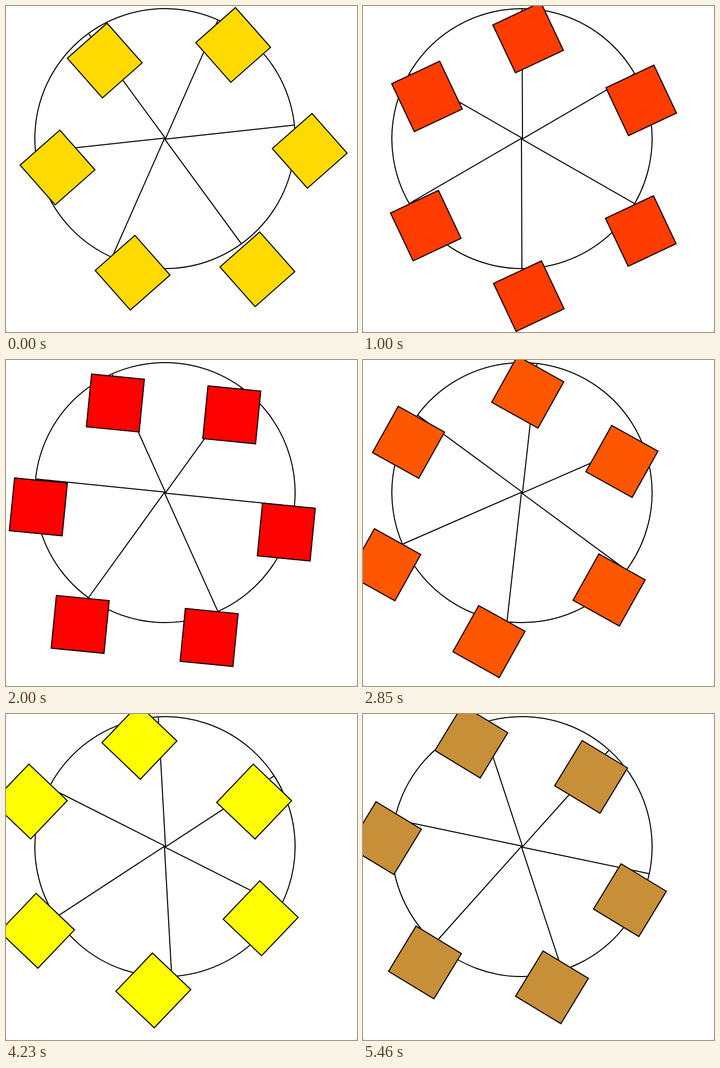
Recreate the animation shown at these times as an HTML page. Size 669 px wide and 622 px high, loop 5.54 s.

```html
<!DOCTYPE html>
<html lang="en">
<head>
<meta charset="utf-8">
<title>Ferris wheel</title>
<style>
  html, body { margin: 0; width: 100%; height: 100%; overflow: hidden; background: #fff; }
  body { position: relative; }

  /* dark specks in the bottom corners */
  body::before, body::after {
    content: ""; position: absolute; bottom: 0; width: 1px; height: 1px; background: #222;
  }
  body::before { left: 0; }
  body::after { right: 0; }

  .wheel {
    position: absolute; left: 54px; top: 4px; width: 494px; height: 494px;
    border: 2px solid #000; border-radius: 50%;
  }
  .line {
    position: absolute; left: 50%; top: 50%; width: 50%; height: 2px;
    background: #000; transform-origin: 0 0;
  }
  .cabin {
    position: absolute; width: 20%; height: 20%;
    border: 2px solid #000; transform-origin: 50% 0;
  }
  .c1 { right: -8.5%; top: 50%; }
  .c2 { right: 17%; top: 93.5%; }
  .c3 { right: 67%; top: 93.5%; }
  .c4 { left: -8.5%; top: 50%; }
  .c5 { left: 17%; top: 7%; }
  .c6 { right: 17%; top: 7%; }
</style>
</head>
<body>
<div class="wheel"></div>
<script>
  const LOOP = 5540, STEPS = 72;
  // the wheel turns in small ticks, several per step
  const START = -66.2, TICK = 0.6, TICKS_PER_STEP = 4.6482;
  const RED = [255, 0, 0], YELLOW = [255, 255, 0], PURPLE = [128, 0, 128];
  const STOPS = [RED, YELLOW, PURPLE, YELLOW, RED];

  const wheel = document.querySelector('.wheel');
  const add = name => {
    const el = document.createElement('div');
    el.className = name;
    return wheel.appendChild(el);
  };
  for (let i = 0; i < 6; i++) add('line').style.transform = `rotate(${i * 60}deg)`;
  const cabins = [1, 2, 3, 4, 5, 6].map(n => add('cabin c' + n));

  // cubic-bezier(.42, 0, .58, 1), solved by bisection
  function easeInOut(x) {
    let lo = 0, hi = 1, s = 0.5;
    for (let i = 0; i < 24; i++) {
      s = (lo + hi) / 2;
      const r = 1 - s;
      if (1.26 * r * r * s + 1.74 * r * s * s + s * s * s < x) lo = s; else hi = s;
    }
    return s * s * (3 - 2 * s);
  }

  function colorAt(turn) {
    const i = Math.floor(turn * 4), k = easeInOut(turn * 4 - i);
    const mix = STOPS[i].map((c, j) => Math.round(c + (STOPS[i + 1][j] - c) * k));
    return `rgb(${mix})`;
  }

  function draw(now) {
    // the picture is held between even steps
    const step = Math.min(STEPS - 1, Math.floor((now % LOOP + 5) * STEPS / LOOP));
    const angle = START + TICK * Math.floor(step * TICKS_PER_STEP);
    const turn = (angle / 360 + 1) % 1;
    const back = -360 * easeInOut(turn), color = colorAt(turn);

    wheel.style.transform = `rotate(${angle}deg)`;
    for (const cabin of cabins) {
      cabin.style.transform = `rotate(${back}deg)`;
      cabin.style.backgroundColor = color;
    }
  }

  function tick() {
    draw(performance.now());
    requestAnimationFrame(tick);
  }
  tick();
</script>
</body>
</html>
```
